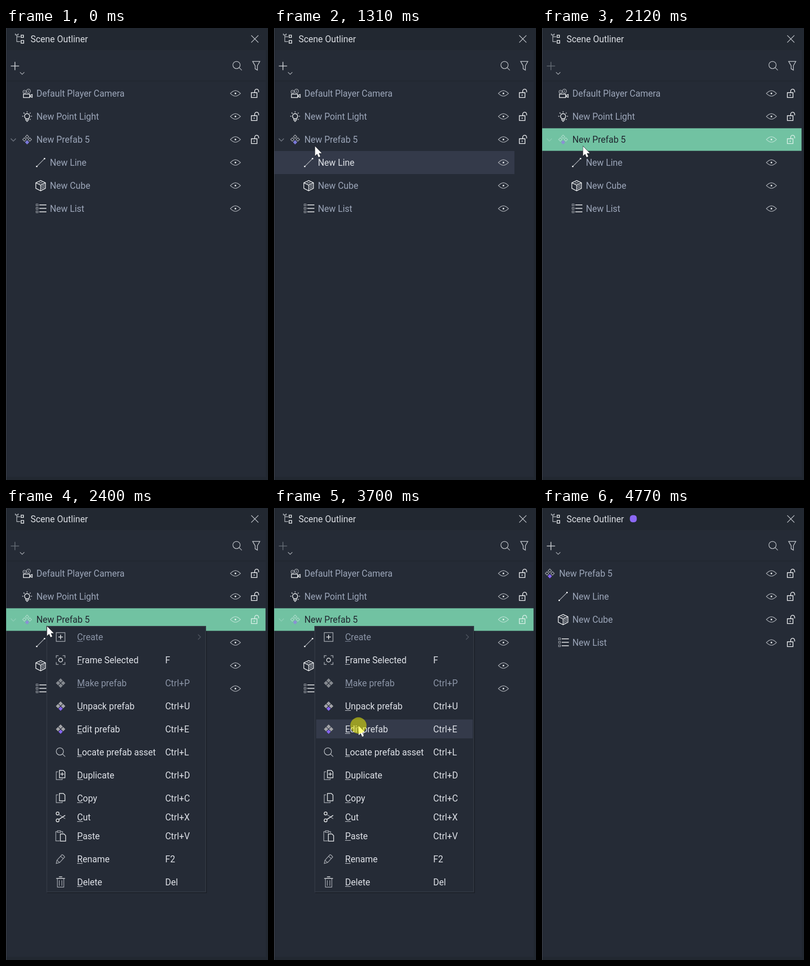
Recreate the animation shown at these times as an HTML page with a canvas. Size 571x981 px, loop 5.02 s.

```html
<!DOCTYPE html>
<html lang="en">
<head>
<meta charset="utf-8">
<title>Scene Outliner</title>
<style>
html, body { margin: 0; width: 100%; height: 100%; overflow: hidden; background: #252b36; }
canvas { display: block; width: 571px; height: 981px; }
</style>
</head>
<body>
<canvas id="stage" width="571" height="981"></canvas>
<script>
const ctx = document.getElementById('stage').getContext('2d');
const LOOP = 5020;
const BG = '#252b36', HOVER = '#343a4a', GREEN = '#71c2a2', PURPLE = '#8565f0';
const WHITE = '#eceef0', GREY = '#a4a8af', TEXT = '#9ba5b8', BRIGHT = '#dde0e6', DIM = '#8b94a6';

// Cursor position from each time on; null hides it.
const cursorKeys = [
  [0, null], [260, [358, 516]], [520, [341, 491]], [780, [151, 302]],
  [1040, [104, 273]], [1310, [89, 256]], [2630, [121, 322]], [2860, [179, 454]],
  [3140, [184, 471]], [3410, [184, 472]], [4520, [551, 850]], [4770, null]
];

const menuItems = [
  ['Create', '', 280, create], ['Frame Selected', 'F', 330, frame],
  ['Make prefab', 'Ctrl+P', 380, (x, y) => diamonds(x, y, '#85898f', '#85898f', true)],
  ['Unpack prefab', 'Ctrl+U', 430, (x, y) => diamonds(x, y, '#a3a4a8', PURPLE, true)],
  ['Edit prefab', 'Ctrl+E', 480, (x, y) => diamonds(x, y, '#a3a4a8', PURPLE, true)],
  ['Locate prefab asset', 'Ctrl+L', 530, search], ['Duplicate', 'Ctrl+D', 580, duplicate],
  ['Copy', 'Ctrl+C', 630, pages], ['Cut', 'Ctrl+X', 671, scissors],
  ['Paste', 'Ctrl+V', 712, paste], ['Rename', 'F2', 762, pencil], ['Delete', 'Del', 812, trash]
];

function rect(x, y, w, h, color) {
  ctx.fillStyle = color;
  ctx.fillRect(x, y, w, h);
}

function at(x, y, draw) {
  ctx.save();
  ctx.translate(x, y);
  draw();
  ctx.restore();
}

function line(path, color = WHITE, width = 1.5) {
  ctx.strokeStyle = color;
  ctx.lineWidth = width;
  ctx.stroke(new Path2D(path));
}

function fill(path, color) {
  ctx.fillStyle = color;
  ctx.fill(new Path2D(path));
}

function ring(x, y, r, color = WHITE, width = 1.5) {
  ctx.beginPath();
  ctx.arc(x, y, r, 0, Math.PI * 2);
  ctx.strokeStyle = color;
  ctx.lineWidth = width;
  ctx.stroke();
}

function disc(x, y, r, color) {
  ctx.beginPath();
  ctx.arc(x, y, r, 0, Math.PI * 2);
  ctx.fillStyle = color;
  ctx.fill();
}

function label(str, x, cy, color) {
  ctx.font = '19.4px Roboto, sans-serif';
  ctx.fillStyle = color;
  ctx.fillText(str, x, cy + 7);
}

function diamonds(x, y, color, accent, solid) {
  const gap = solid ? 5.6 : 6, r = solid ? 4.7 : 3.7;
  const shape = `M0 ${-r}L${r} 0 0 ${r} ${-r} 0z`;
  [[0, -gap], [-gap, 0], [gap, 0]].forEach(([dx, dy]) =>
    at(x + dx, y + dy, () => solid ? fill(shape, color) : line(shape, color, 1.4)));
  at(x, y + gap, () => fill('M0-4.7L4.7 0 0 4.7-4.7 0z', accent));
}

function camera(x, y) {
  at(x, y, () => {
    ring(-5.5, -3.5, 3.4, GREY, 1.4);
    ring(3, -5, 4.3, GREY, 1.4);
    disc(-5.5, -3.5, 1, GREY);
    disc(3, -5, 1.2, GREY);
    line('M-8 1.5H5.5V9H-8z M6 5L11 2.2V8.6L6 6');
  });
}

function bulb(x, y) {
  at(x, y, () => {
    ring(0, -0.5, 5.6, WHITE, 1.6);
    line('M-3 4.5V8H3V4.5 M-2 10.5H2', WHITE, 1.3);
    for (const turn of [-4, -3, -2, -1, 0, 1, 5]) {
      const dx = Math.cos(turn * Math.PI / 4), dy = Math.sin(turn * Math.PI / 4);
      line(`M${dx * 8} ${dy * 8 - 0.5}L${dx * 10.8} ${dy * 10.8 - 0.5}`, '#c8cbd0', 1.5);
    }
  });
}

function segment(x, y) {
  at(x, y, () => {
    line('M-8.5 8.5L8.5-8.5', GREY, 1.4);
    rect(-10, 7, 3, 3, WHITE);
    rect(7, -10, 3, 3, WHITE);
  });
}

function cube(x, y) {
  at(x, y, () => {
    line('M0-11L10.5-6V6L0 11.5-10.5 6V-6z M-10.5-6L0-1 10.5-6 M0-1V11.5', WHITE, 1.5);
    line('M-5-8.5L5.5-3.5 M5-8.5L-5.5-3.5 M3.5-2.5V9.5 M7-4.5V7.5 M0 3L10.5-2 M0 7L10.5 2', GREY, 1);
  });
}

function list(x, y) {
  at(x, y, () => {
    for (const dy of [-8, -0.5, 7]) {
      line(`M-9.8 ${dy - 2}h4v4h-4z`, GREY, 1.2);
      line(`M-3 ${dy}H12.5`, WHITE, 1.7);
    }
  });
}

function eye(y, color, pupil) {
  at(500, y, () => {
    line('M-11 0Q-5-6 0-6T11 0Q5 5.9 0 5.9T-11 0z', color, 1.4);
    rect(-1.6, -1.6, 3.2, 3.2, pupil);
  });
}

function lock(y, color, hole) {
  at(541, y, () => {
    line('M-6.3-1.6H6V8.7H-6.3z M1-1.6V-5A4.3 4.3 0 0 1 9.6-5V-2.5', color, 1.6);
    rect(-1.5, 2.3, 2.8, 2.8, hole);
  });
}

function search(x, y) {
  at(x, y, () => {
    ring(-1.6, -1.7, 7.9, '#b5b9bf', 1.5);
    line('M4.2 4.1L10 9.8', GREY, 1.5);
  });
}

function create(x, y) {
  at(x, y, () => {
    line('M-9.5-9.5H9.5V9.5H-9.5z', GREY, 1.5);
    line('M-5 0H5 M0-5V5', WHITE, 1.6);
  });
}

function frame(x, y) {
  at(x, y, () => {
    line('M-9.5-4.5V-9.5H-4.5 M4.5-9.5H9.5V-4.5 M9.5 4.5V9.5H4.5 M-4.5 9.5H-9.5V4.5', GREY, 1.5);
    ring(0, 0, 4.3);
  });
}

function pages(x, y) {
  at(x, y, () => {
    line('M-5.5-7.5H-9.5V9.5H3.5V7', GREY, 1.4);
    line('M-2.5-10.5H6L9.5-7V5.5H-2.5z', WHITE, 1.5);
  });
}

function duplicate(x, y) {
  pages(x, y);
  at(x, y, () => line('M-.5-2.5H7.5 M3.5-6.5V1.5', WHITE, 1.4));
}

function scissors(x, y) {
  at(x, y, () => {
    ring(-6.5, -8, 3.2);
    ring(-6.5, 7, 3.2);
    line('M-4-6L10 3.5', GREY);
    line('M-4 5L10-4');
  });
}

function paste(x, y) {
  at(x, y, () => {
    line('M-2 10.5H-10.5V-9.5H-7 M0-9.5H4.5V-6 M-7-11.5H0V-8H-7z', GREY, 1.4);
    line('M-.5-4.5H7.5L11-1V11H-.5z', WHITE, 1.5);
  });
}

function pencil(x, y) {
  at(x, y, () => line('M-9.5 9.5L-8 2.5 3-9.5Q5-10 9-4.5L-2 7.5z M-8 2.5L-2 7.5 M0-6L6-1', GREY, 1.4));
}

function trash(x, y) {
  at(x, y, () => {
    line('M-9.5-8H9.5 M-3.5-11.5H3.5', WHITE, 1.4);
    line('M-7-8V10.8H7V-8 M-2.7-4V8 M2.7-4V8', GREY, 1.4);
  });
}

function prefab(x, y, state) {
  if (state === 'selected') diamonds(x, y, '#a9dac8', '#8b91d4');
  else diamonds(x, y, '#a0a4aa', '#7a78d8');
}

function row(y, x, text, icon, { state, locked = true, arrow } = {}) {
  const selected = state === 'selected';
  if (selected) rect(0.5, y - 24.4, 565.1, 49, GREEN);
  else if (state) rect(1, y - 25, locked ? 565 : 523, 50, HOVER);
  if (arrow) line(`M10.5 ${y - 2}l5.5 5.5 5.5-5.5`, selected ? '#89ccb2' : '#666c77', 1.8);
  icon(x, y, state);
  label(text, x + 20.2, y, selected ? '#20262f' : state ? BRIGHT : TEXT);
  eye(y, selected ? '#b5dfd0' : GREY, selected ? '#e5f4ee' : WHITE);
  if (locked) lock(y, selected ? '#d9efe7' : WHITE, selected ? '#c5e6da' : GREY);
}

function panel(plusColor, edited) {
  rect(0, 0, 571, 981, BG);
  rect(0, 0, 571, 48, '#222831');
  rect(0, 114, 566, 2, '#222831');
  rect(566, 48, 5, 933, '#222831');
  rect(0, 974, 571, 7, '#222831');
  rect(0, 0, 1, 981, '#434851');

  line('M20.5 12V15H26.5V12 M23.5 15V29.5H31 M23.5 19H31', '#b5b9bf', 1.4);
  line('M33 15.5H38V20.5H33z M33 27H38.5V33H33z', WHITE, 1.6);
  label('Scene Outliner', 53.4, 24, '#d9dce1');
  if (edited) {
    ctx.beginPath();
    ctx.roundRect(191.5, 15.5, 15, 15.5, 6);
    ctx.fillStyle = '#8c68f4';
    ctx.fill();
  }
  line('M534.5 16L550 31.5M550 16L534.5 31.5', '#c0c4ca', 1.4);
  line('M10.5 82.5H28.5M19.5 73.5V91.5', plusColor, 1.6);
  line('M30.5 96L35.2 100.5 40 96', GREY, 1.4);
  search(504, 82);
  line('M537.5 72.5H553.2L547.8 82V91.5L543 88.5V82z', '#c0c4ca', 1.5);
}

function sceneRows(t) {
  const prefabState = t >= 2120 ? 'selected' : t >= 1590 ? 'hover' : '';
  const lineState = t >= 1040 && t < 1590 ? 'hover' : '';
  row(142, 46, 'Default Player Camera', camera);
  row(192, 46, 'New Point Light', bulb);
  row(292, 75.5, 'New Line', segment, { locked: false, state: lineState });
  row(342, 75.5, 'New Cube', cube, { locked: false });
  row(392, 75.5, 'New List', list, { locked: false });
  row(242, 46, 'New Prefab 5', prefab, { state: prefabState, arrow: true });
}

function prefabRows() {
  row(142, 17, 'New Prefab 5', (x, y) => diamonds(x, y, '#a0a4aa', PURPLE));
  row(192, 46, 'New Line', segment);
  row(242, 46, 'New Cube', cube);
  row(292, 46, 'New List', list);
}

function menu(hovered) {
  rect(90, 267, 348, 569, '#1c2129');
  rect(88, 256, 348, 578, '#303641');
  rect(90, 258, 344, 574, BG);
  menuItems.forEach(([text, key, y, icon], i) => {
    const color = i === 0 || i === 2 ? DIM : BRIGHT;
    if (i === hovered) rect(92, y - 21, 341, 41, HOVER);
    icon(119, y);
    label(text, 155, y, color);
    rect(155, y + 9, ctx.measureText(text[0]).width, 1, color);
    label(key, 347, y, color);
  });
  line('M418.5 274.5L424 280 418.5 285.5', '#505661', 1.5);
}

function cursor([x, y]) {
  at(x, y, () => {
    const arrow = 'M.5 .8V21.5L5 17.2 8.2 24.4 11.8 22.8 8.7 15.8H15z';
    line(arrow, '#15191f', 1.2);
    fill(arrow, '#fff');
  });
}

function draw(t) {
  const inPrefab = t >= 4260;
  panel(t >= 2120 && !inPrefab ? '#6a707a' : '#d5d8dc', inPrefab);
  if (inPrefab) prefabRows();
  else sceneRows(t);
  if (t >= 2400 && t < 3970) menu(t >= 3140 ? 4 : t >= 2860 ? 3 : -1);
  const pos = cursorKeys.filter(([start]) => start <= t).pop()[1];
  if (pos) cursor(pos);
  if (t >= 3700 && t < 3970) disc(184, 472, 17.7, 'rgba(255,255,0,.5)');
}

function tick() {
  draw(performance.now() % LOOP);
  requestAnimationFrame(tick);
}
tick();
</script>
</body>
</html>
```
